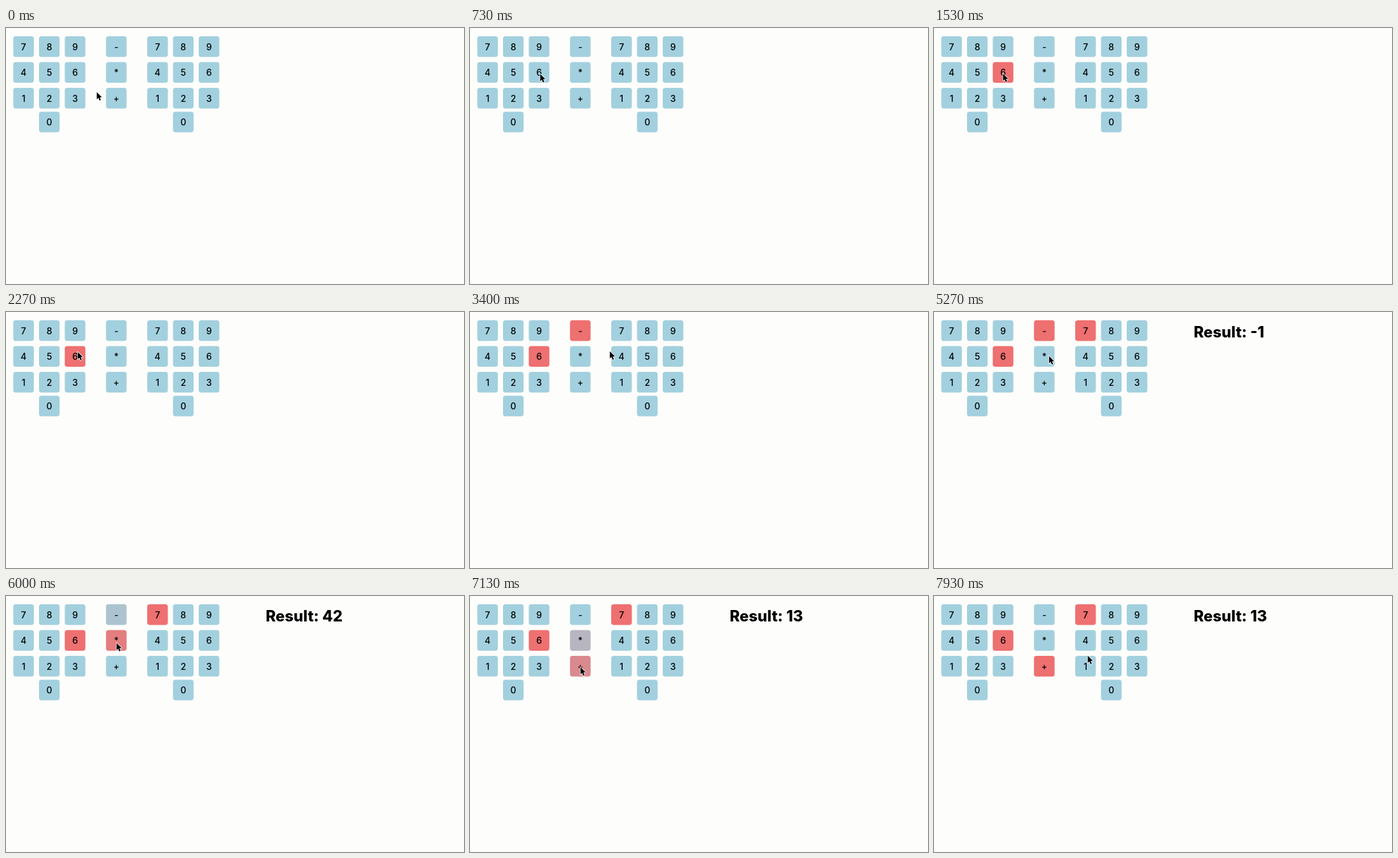
These frames come from a looping animation (720 by 402 pixels, 8 s). An HTML page with a canvas:

```html
<!DOCTYPE html>
<html lang="en">
<head>
<meta charset="utf-8">
<title>Button calculator</title>
<style>
  html, body { margin: 0; width: 100%; height: 100%; overflow: hidden; background: #fdfdfb; }
  canvas { display: block; width: 720px; height: 402px; }
</style>
</head>
<body>
<canvas id="stage"></canvas>
<script>
const W = 720, H = 402, LOOP = 8000;
const SIZE = 32.4, PITCH = 40.5, FADE = 300;
const PAPER = '#fdfdfb', IDLE = [163, 208, 222], ACTIVE = [238, 112, 112];
const FONT = 'Inter, "Open Sans", sans-serif';

const canvas = document.getElementById('stage');
const ratio = window.devicePixelRatio || 1;
canvas.width = Math.round(W * ratio);
canvas.height = Math.round(H * ratio);
const ctx = canvas.getContext('2d');

const OPS = {
  '-': (a, b) => a - b,
  '*': (a, b) => a * b,
  '+': (a, b) => a + b
};

// Stops of the pointer; those with a group press a button there
const stops = [
  { t: 0, x: 142, y: 100 },
  { t: 1100, x: 109, y: 71, group: 'left', label: '6' },
  { t: 2270, x: 112, y: 62, passing: true },
  { t: 2900, x: 173, y: 31, group: 'op', label: '-' },
  { t: 3400, x: 219, y: 61, passing: true },
  { t: 4070, x: 234, y: 35, group: 'right', label: '7' },
  { t: 5830, x: 173, y: 73, group: 'op', label: '*' },
  { t: 7000, x: 173, y: 111, group: 'op', label: '+' },
  { t: 7930, x: 241, y: 93 }
];
const HOLD_BEFORE = 300, HOLD_AFTER = 250;
const presses = stops.filter(s => s.group);

const buttons = [];
function addPad(group, x) {
  for (let n = 1; n <= 9; n++) {
    const col = (n - 1) % 3, row = 2 - Math.floor((n - 1) / 3);
    buttons.push({ group, label: String(n), x: x + col * PITCH, y: 13 + row * PITCH });
  }
  buttons.push({ group, label: '0', x: x + PITCH, y: 131.4 });
}
addPad('left', 11.4);
addPad('right', 222);
Object.keys(OPS).forEach((label, row) =>
  buttons.push({ group: 'op', label, x: 157.2, y: 13 + row * PITCH }));

const clamp = v => Math.min(1, Math.max(0, v));
const mix = (a, b, k) => a + (b - a) * k;

// The standard CSS "ease" curve: cubic-bezier(.25, .1, .25, 1)
function ease(p) {
  p = clamp(p);
  let lo = 0, hi = 1, s = p;
  for (let i = 0; i < 18; i++) {
    s = (lo + hi) / 2;
    const x = 0.75 * s * (1 - s) + s * s * s;
    if (x < p) lo = s; else hi = s;
  }
  return 0.3 * s * (1 - s) * (1 - s) + 3 * s * s * (1 - s) + s * s * s;
}

// A press lights its own button and releases the others of its group
function level(button, t) {
  let lit = false, value = 0;
  for (const press of presses) {
    if (press.group !== button.group || press.t > t) continue;
    const hit = press.label === button.label;
    if (hit !== lit) {
      const k = ease((t - press.t) / FADE);
      value = hit ? k : 1 - k;
      lit = hit;
    }
  }
  return value;
}

// Pointer speed along one axis: zero at rests, mean speed where it passes by
function speed(i, axis) {
  if (!stops[i].passing) return 0;
  const a = stops[i - 1], b = stops[i + 1];
  const time = (b.t - HOLD_BEFORE) - (a.t + HOLD_AFTER);
  return (b[axis] - a[axis]) / time;
}

function pointerAt(t) {
  let i = 0;
  while (i < stops.length - 2 && stops[i + 1].t <= t) i++;
  const a = stops[i], b = stops[i + 1];
  const from = a.t + (a.group ? HOLD_AFTER : 0);
  const span = b.t - (b.group ? HOLD_BEFORE : 0) - from;
  const k = clamp((t - from) / span);
  const s = k * k * (3 - 2 * k);
  return ['x', 'y'].map(axis =>
    mix(a[axis], b[axis], s)
    + span * speed(i, axis) * k * (1 - k) * (1 - k)
    - span * speed(i + 1, axis) * k * k * (1 - k));
}

function drawButton(button, t) {
  const { label, x, y } = button;
  const k = level(button, t);
  const rgb = IDLE.map((v, i) => Math.round(mix(v, ACTIVE[i], k)));
  ctx.fillStyle = `rgb(${rgb})`;
  ctx.beginPath();
  ctx.roundRect(x, y, SIZE, SIZE, 4);
  ctx.fill();
  ctx.fillStyle = '#000';
  ctx.font = '500 14px ' + FONT;
  ctx.textAlign = 'center';
  ctx.fillText(label, x + SIZE / 2, y + 21.5);
}

function drawResult(t) {
  const chosen = {};
  for (const press of presses) {
    if (press.t <= t) chosen[press.group] = press.label;
  }
  if (!chosen.left || !chosen.op || !chosen.right) return;
  const value = OPS[chosen.op](Number(chosen.left), Number(chosen.right));
  ctx.fillStyle = '#000';
  ctx.font = '800 24px ' + FONT;
  ctx.textAlign = 'left';
  ctx.fillText('Result: ' + value, 408.2, 40);
}

const arrow = [[0, 0], [0, 11.4], [2.6, 9], [4.4, 13.2], [6.4, 12.3], [4.6, 8.2], [8, 8]];
function drawPointer(t) {
  const [px, py] = pointerAt(t);
  ctx.beginPath();
  arrow.forEach(([x, y]) => ctx.lineTo(px + 0.7 + x, py + 0.7 + y));
  ctx.closePath();
  ctx.lineJoin = 'round';
  ctx.lineWidth = 1.6;
  ctx.strokeStyle = '#fff';
  ctx.stroke();
  ctx.fillStyle = '#000';
  ctx.fill();
}

function draw(now) {
  const t = now % LOOP;
  ctx.setTransform(canvas.width / W, 0, 0, canvas.height / H, 0, 0);
  ctx.fillStyle = PAPER;
  ctx.fillRect(0, 0, W, H);
  buttons.forEach(button => drawButton(button, t));
  drawResult(t);
  drawPointer(t);
}

const start = performance.now();
function tick() {
  draw(performance.now() - start);
  requestAnimationFrame(tick);
}
tick();
</script>
</body>
</html>
```
